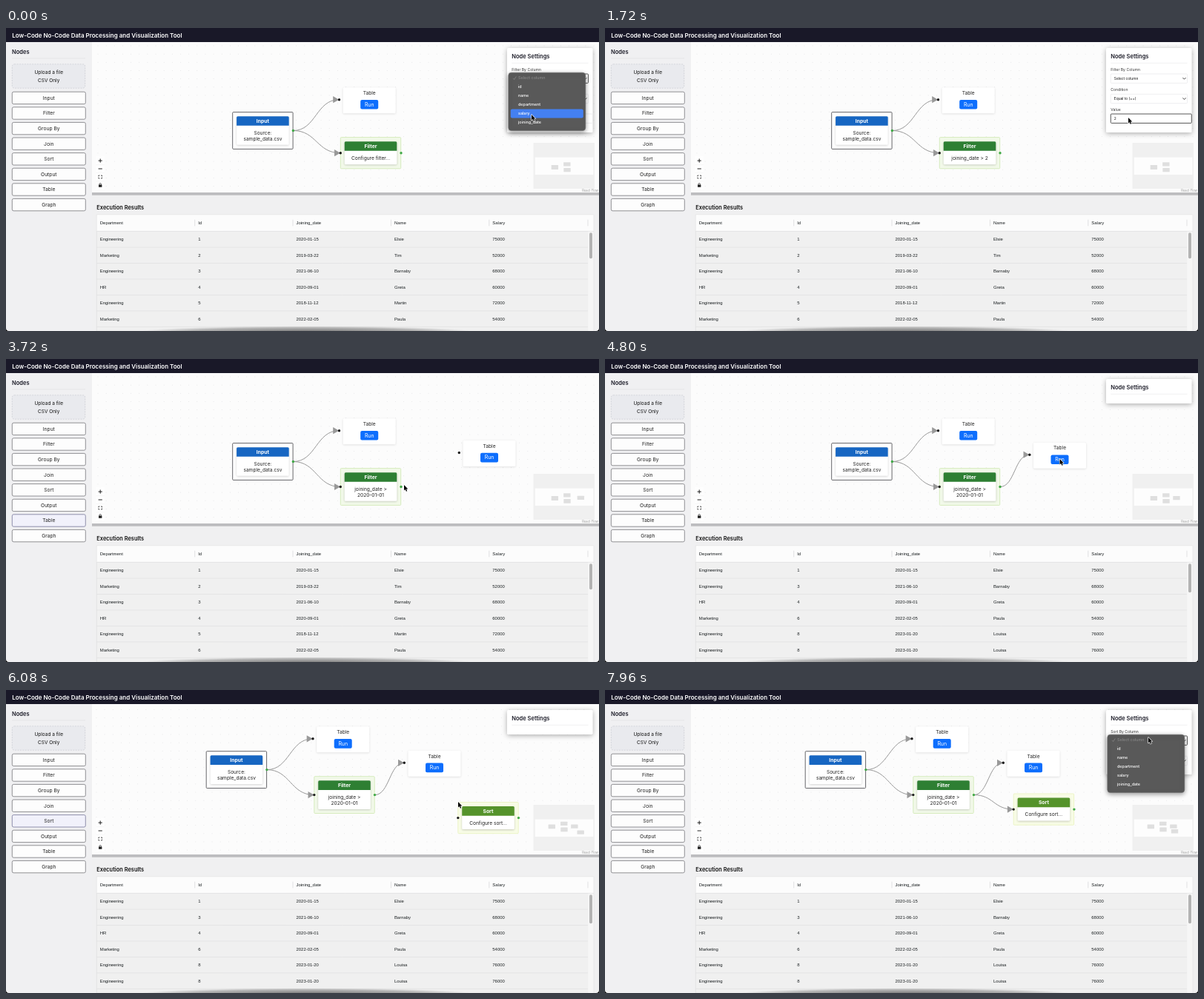
Animation, 800 px wide and 409 px high, one loop 8 s. Source, as an HTML page with a canvas:

```html
<!DOCTYPE html>
<html lang="en">
<head>
<meta charset="utf-8">
<title>Low-Code Data Tool</title>
<style>
  html, body { margin: 0; width: 100%; height: 100%; overflow: hidden; background: #f0f0f1; }
  canvas { display: block; width: 800px; height: 409px; }
</style>
</head>
<body>
<canvas id="stage"></canvas>
<script>
const LOOP = 8000, W = 800, H = 409;
const UI = 'Inter, Roboto, sans-serif';
const GRID = '"Liberation Sans", Arial, sans-serif';
const canvas = document.getElementById('stage');
const ctx = canvas.getContext('2d');
const dpr = window.devicePixelRatio || 1;
canvas.width = W * dpr;
canvas.height = H * dpr;

const BUTTONS = ['Input', 'Filter', 'Group By', 'Join', 'Sort', 'Output', 'Table', 'Graph'];
const COLUMNS = ['Select column', 'id', 'name', 'department', 'salary', 'joining_date'];
const CONDITIONS = ['Equal to (==)', 'Not equal to (!=)', 'Greater than (>)',
  'Greater than or equal to (≥)', 'Less than (<)', 'Less than or equal to (<=)', 'Contains'];
const PEOPLE = {
  1: ['Engineering', '2020-01-15', 'Elsie', '75000'],
  2: ['Marketing', '2019-03-22', 'Tim', '52000'],
  3: ['Engineering', '2021-06-10', 'Barnaby', '68000'],
  4: ['HR', '2020-09-01', 'Greta', '60000'],
  5: ['Engineering', '2018-11-12', 'Martin', '72000'],
  6: ['Marketing', '2022-02-05', 'Paula', '54000'],
  8: ['Engineering', '2023-01-20', 'Louisa', '76000']
};

// Cursor path: time, x, y of the tip
const PATH = [
  [0, 709, 117], [60, 709, 117], [180, 707, 126], [280, 707, 126], [500, 734, 93], [600, 734, 93],
  [820, 727, 122], [940, 727, 122], [1300, 706, 121], [2440, 706, 121], [2700, 566, 172],
  [2820, 566, 172], [3080, 66, 241], [3180, 58, 217], [3240, 58, 217], [3480, 617, 110],
  [3520, 617, 110], [3720, 537, 170], [3800, 533, 172], [4060, 611, 126], [4120, 611, 126],
  [4320, 652, 132], [4560, 652, 132], [4800, 613.5, 135], [4840, 613.5, 135],
  [4960, 391.5, 171], [5000, 391.5, 171], [5280, 356, 140], [5400, 356, 140], [5680, 58, 177],
  [5780, 58, 177], [6040, 610, 151], [6100, 610, 151], [6360, 497, 142], [6420, 497, 142],
  [6700, 605, 171], [6740, 606, 171], [6780, 610, 172], [6900, 650, 163], [6960, 650, 163],
  [7200, 591.5, 151], [7300, 591.5, 151], [7600, 733, 64], [LOOP, 733, 64]
];

const within = (t, a, b) => t >= a && t < b;
const ease = k => k * k * (3 - 2 * k);
const ramp = (t, a, b) => ease(Math.min(1, Math.max(0, (t - a) / (b - a))));
const lerp = (a, b, k) => a + (b - a) * k;

function cursorAt(t) {
  const i = Math.max(1, PATH.findIndex(p => p[0] >= t));
  const a = PATH[i - 1], b = PATH[i];
  const k = ramp(t, a[0], b[0]);
  return { x: lerp(a[1], b[1], k), y: lerp(a[2], b[2], k) };
}

function rect(x, y, w, h, fill, stroke, r = 0, line = 0.6) {
  ctx.beginPath();
  ctx.roundRect(x, y, w, h, r);
  if (fill) { ctx.fillStyle = fill; ctx.fill(); }
  if (stroke) { ctx.strokeStyle = stroke; ctx.lineWidth = line; ctx.stroke(); }
}

function shadowed(blur, color, dy, draw) {
  ctx.save();
  ctx.shadowColor = color;
  ctx.shadowBlur = blur * dpr;
  ctx.shadowOffsetY = dy * dpr;
  draw();
  ctx.restore();
}

// y is the middle of the capitals
function text(str, x, y, size, color = '#222', weight = 400, align = 'left', family = UI) {
  ctx.font = `${weight} ${size}px ${family}`;
  ctx.textAlign = align;
  ctx.fillStyle = color;
  ctx.fillText(str, x, y + size * 0.36);
}

function line(color, width, ...pts) {
  ctx.beginPath();
  pts.forEach(([x, y], i) => i ? ctx.lineTo(x, y) : ctx.moveTo(x, y));
  ctx.strokeStyle = color;
  ctx.lineWidth = width;
  ctx.stroke();
}

function dot(x, y, color) {
  ctx.beginPath();
  ctx.arc(x, y, 1.7, 0, 7);
  ctx.fillStyle = color;
  ctx.fill();
}

function sideButton(label, x, y, hover) {
  rect(x, y, 99, 16.4, hover ? '#f1f1fb' : '#fdfdfd', hover ? '#77779a' : '#77777c', 2, 0.8);
  text(label, x + 49.5, y + 8.2, 6.7, '#222', 400, 'center');
}

const buttonY = i => 86.2 + i * 20.6;

function drawSidebar(t, cur) {
  rect(0, 19, 116, 390, '#f0f0f2');
  text('Nodes', 8, 31.8, 7.5, '#1c1c28', 600);
  line('#dcdce0', 0.6, [8, 41], [107, 41]);
  ctx.setLineDash([2, 1.4]);
  rect(8.3, 48.8, 98.4, 32.4, '#e9eaee', '#c3c5cc', 3);
  ctx.setLineDash([]);
  text('Upload a file', 57.7, 59.8, 6.5, '#111', 400, 'center');
  text('CSV Only', 57.7, 71, 6.5, '#111', 400, 'center');
  const stuck = within(t, 3180, 3960) ? 6 : within(t, 5680, 6300) ? 4 : -1;
  BUTTONS.forEach((label, i) => {
    const y = buttonY(i);
    const over = cur.x > 8 && cur.x < 107 && cur.y > y && cur.y < y + 16.4;
    sideButton(label, 8.3, y, over || i === stuck);
  });
}

function drawDots(pan) {
  const gap = 11.15;
  ctx.fillStyle = '#dedee0';
  const x0 = 116 + (((8 + pan.x) % gap) + gap) % gap;
  const y0 = 19 + (((5 + pan.y) % gap) + gap) % gap;
  for (let x = x0; x < W; x += gap)
    for (let y = y0; y < 222; y += gap) ctx.fillRect(x - 0.4, y - 0.4, 0.8, 0.8);
}

function edge(a, b, loose) {
  const mid = (a.x + b.x) / 2;
  ctx.beginPath();
  ctx.moveTo(a.x, a.y);
  ctx.bezierCurveTo(mid, a.y, mid, b.y, b.x, b.y);
  ctx.strokeStyle = loose ? '#a8a8a8' : '#999';
  ctx.lineWidth = loose ? 0.7 : 1;
  ctx.stroke();
  if (loose) return;
  ctx.beginPath();
  ctx.moveTo(b.x, b.y);
  ctx.lineTo(b.x - 8, b.y - 4.6);
  ctx.lineTo(b.x - 8, b.y + 4.6);
  ctx.closePath();
  ctx.fillStyle = '#999';
  ctx.fill();
}

// Nodes are placed by the middle of their top edge
const outPort = n => ({ x: n.x + 41, y: n.y + n.h / 2 });
const inPort = n => n.kind === 'Table' ? { x: n.x - 41, y: n.y + 16.5 } : { x: n.x - 41, y: n.y + n.h / 2 };

const STYLES = {
  Input: { head: '#1766c2', fill: '#fff', border: '#55555a', radius: 1 },
  Filter: { head: '#2e7f33', fill: '#f2f9e9', border: '#d3eab8', radius: 1 },
  Sort: { head: '#55932b', fill: '#f8fce6', border: '#eaf3c2', radius: 1 }
};

function drawNode(n) {
  const { x, y, h } = n;
  if (n.kind === 'Table') {
    shadowed(3, 'rgba(0,0,0,.13)', 0.8, () => rect(x - 35.5, y, 71, 35, '#fff', null, 1.5));
    text('Table', x, y + 7.4, 6.6, '#222', 400, 'center');
    rect(x - 12, y + 16.8, 24, 12.6, '#0d6efd', null, 2);
    text('Run', x, y + 23, 6.9, '#fff', 400, 'center');
    const p = inPort(n);
    dot(p.x + 0.3, p.y, '#1a1a1a');
    return;
  }
  const s = STYLES[n.kind];
  rect(x - 40.7, y + 0.4, 81.4, h - 0.8, s.fill, s.border, s.radius, 0.9);
  shadowed(3, 'rgba(0,0,0,.2)', 0.8, () => rect(x - 35.3, y + 6, 70.6, h - 12, '#fff', null, 1.5));
  rect(x - 35.3, y + 6, 70.6, 12.6, s.head, null, [1.5, 1.5, 0, 0]);
  text(n.kind, x, y + 12.4, 6.8, '#fff', 700, 'center');
  n.lines.forEach((l, i) => text(l, x, y + 28.2 + i * 7.8, 6.6, '#222', 400, 'center'));
  const o = outPort(n);
  dot(o.x, o.y, '#3fa845');
  if (n.kind !== 'Input') {
    const p = inPort(n);
    dot(p.x + 0.3, p.y, '#1a1a1a');
  }
}

function typedValue(t) {
  const count = Math.floor((t - 1680) / 60) + 1;
  return '2020-01-01'.slice(0, Math.max(0, Math.min(10, count)));
}

function filterLines(t) {
  if (t < 240) return ['Configure filter...'];
  if (t < 920) return ['joining_date =='];
  const value = typedValue(t);
  if (!value) return ['joining_date >'];
  return value.length < 3 ? ['joining_date > ' + value] : ['joining_date >', value];
}

function buildNodes(t, pan) {
  const make = (kind, x, y, lines = []) => ({
    kind, lines, x: x + pan.x, y: y + pan.y,
    h: kind === 'Table' ? 35 : lines.length > 1 ? 50.6 : 43
  });
  const slide = ramp(t, 4560, 4800), drop = ramp(t, 6960, 7200);
  const nodes = {
    input: make('Input', 346.4, 113.2, ['Source:', 'sample_data.csv']),
    table: make('Table', 490.2, 80.2),
    filter: make('Filter', 492, 147.2, filterLines(t))
  };
  if (t >= 3500) nodes.second = make('Table', lerp(652, 613.5, slide), lerp(110, 112.7, slide));
  if (t >= 6060) nodes.sort = make('Sort', lerp(686, 627.4, drop), lerp(182, 170.5, drop), ['Configure sort...']);
  return nodes;
}

function drawControls() {
  rect(121.5, 173.5, 11.6, 44.5, '#fefefe');
  [184.6, 195.6, 206.7].forEach(y => line('#eee', 0.5, [121.5, y], [133, y]));
  line('#222', 1, [124.6, 179.1], [129.8, 179.1]);
  line('#222', 1, [127.2, 176.5], [127.2, 181.7]);
  line('#222', 1, [124.6, 190], [129.8, 190]);
  for (const [sx, sy] of [[-1, -1], [1, -1], [1, 1], [-1, 1]]) {
    const x = 127.2 + sx * 2.3, y = 201 + sy * 2;
    line('#222', 0.8, [x - sx * 1.4, y], [x, y], [x, y - sy * 1.3]);
  }
  rect(125, 211.6, 4.4, 3.2, '#222', null, 0.5);
  rect(126, 209.6, 2.4, 3, null, '#222', 1, 0.7);
}

function drawMinimap(nodes) {
  const k = 0.1145;
  rect(711.5, 155, 82.5, 62, '#f0f0f0');
  rect(713.8, 174.5, 78.6, 23.6, '#fdfdfd');
  for (const n of Object.values(nodes)) {
    const x = 714 + (n.x - 41 - 116) * k, y = 174.3 + (n.y - 19) * k;
    rect(x, y, 82 * k, Math.max(n.h, 46) * k, '#dfdfdf', null, 0.5);
  }
  text('React Flow', 799, 219.8, 4.2, '#999', 400, 'right');
}

function field(label, value, y, focus, chevron = true) {
  text(label, 682.3, y - 11.7, 5.1, '#333');
  rect(682.3, y - 6, chevron ? 103.2 : 109, 12.4, '#fff', focus ? '#444' : '#e3e3e6', 1, focus ? 0.9 : 0.6);
  text(value, 686.8, y, 4.85, '#111');
  if (chevron) line('#222', 0.8, [779.4, y - 1], [781.5, y + 1.2], [783.6, y - 1]);
}

function drawPanel(t) {
  const mode = t < 2800 ? 'filter' : t < 4400 ? null : t < 6960 ? 'empty' : 'sort';
  if (!mode) return;
  const bottom = { filter: 141, empty: 60, sort: 114 }[mode];
  shadowed(7, 'rgba(0,0,0,.32)', 1.5, () => rect(676, 27, 115.6, bottom - 27, '#fff', null, 1.5));
  text('Node Settings', 682.3, 38.5, 7.5, '#1c1c28', 600);
  line('#e6e6e8', 0.6, [682.3, 47.3], [785.5, 47.3]);
  if (mode === 'filter') {
    field('Filter By Column', 'Select column', 68, t < 500);
    field('Condition', 'Equal to (==)', 95.3, within(t, 560, 1300));
    field('Value', typedValue(t), 122, within(t, 1340, 2800), false);
  } else if (mode === 'sort') {
    field('Sort By Column', 'Select column', 68, t >= 7680);
    field('Order', 'Ascending', 95.3, false);
  }
}

function dropdown(items, top, cur, mutedFirst) {
  const first = top + 7, pitch = 12.05;
  const h = items.length * pitch + 6;
  shadowed(6, 'rgba(0,0,0,.4)', 2, () => rect(677.8, top, 104, h, '#595959', '#6d6d6d', 4, 0.5));
  items.forEach((label, i) => {
    const y = first + i * pitch;
    const muted = mutedFirst && i === 0;
    if (!muted && Math.abs(cur.y - y) < pitch / 2 && cur.x > 678 && cur.x < 782)
      rect(680.8, y - 6, 98, 12.2, '#4480f2', null, 2);
    const color = muted ? '#878787' : '#fff';
    text(label, 691, y, 5.4, color, 500);
    if (i === 0) line(color, 0.8, [684.2, y + 0.6], [685.6, y + 2.4], [688.3, y - 1.8]);
  });
}

function drawResults(t) {
  rect(116, 222, 684, 187, '#f0f0f1');
  rect(116, 222, 684, 3.8, '#bdbdbf');
  text('Execution Results', 122.3, 242.8, 7.45, '#111', 600);
  rect(122.3, 252, 670.5, 157, '#f0f0f0', '#dadadc');
  rect(122.6, 252.3, 670, 22, '#fcfcfc');
  const xs = [126.8, 259.2, 391.5, 523.9, 656.3];
  const cell = (s, i, y, color) => text(s, xs[i], y, 5.95, color, 400, 'left', GRID);
  ['Department', 'Id', 'Joining_date', 'Name', 'Salary'].forEach((s, i) => cell(s, i, 263, '#181d1f'));
  [254.7, 387, 519.4, 651.8, 785].forEach(x => line('#d5d5d7', 0.7, [x, 258.7], [x, 267.3]));
  line('#d8d8da', 0.6, [122.3, 274.4], [792.8, 274.4]);
  const ids = t < 4480 ? [1, 2, 3, 4, 5, 6] : [1, 3, 4, 6, 8, 8];
  ids.forEach((id, i) => {
    const y = 285.3 + i * 21.45;
    const [dept, date, name, pay] = PEOPLE[id];
    [dept, String(id), date, name, pay].forEach((s, c) => cell(s, c, y, '#181d1f'));
    line('#dcdcde', 0.6, [122.3, y + 10.8], [785, y + 10.8]);
  });
  rect(785.2, 274.8, 7.4, 134, '#f6f6f6');
  rect(787, 276.3, 4, t < 4480 ? 35 : 39, '#b3b3b3', null, 2);
}

function drawScreenEdge() {
  ctx.save();
  ctx.translate(405, H + 1);
  ctx.scale(1, 0.034);
  const g = ctx.createRadialGradient(0, 0, 0, 0, 0, 225);
  g.addColorStop(0, 'rgba(0,0,0,.5)');
  g.addColorStop(0.7, 'rgba(0,0,0,.25)');
  g.addColorStop(1, 'rgba(0,0,0,0)');
  ctx.fillStyle = g;
  ctx.fillRect(-225, -225, 450, 225);
  ctx.restore();
  ctx.fillStyle = '#000';
  for (const [x, s] of [[0, 1], [W, -1]]) {
    ctx.beginPath();
    ctx.moveTo(x, H - 4);
    ctx.quadraticCurveTo(x, H, x + 4 * s, H);
    ctx.lineTo(x, H);
    ctx.fill();
  }
}

function drawArrow({ x, y }) {
  const shape = [[0, 0], [0, 7.6], [1.7, 6.1], [2.9, 8.8], [4.2, 8.2], [3, 5.6], [5.3, 5.4]];
  ctx.beginPath();
  shape.forEach(([dx, dy]) => ctx.lineTo(x + dx, y + dy));
  ctx.closePath();
  ctx.lineJoin = 'round';
  ctx.strokeStyle = '#fff';
  ctx.lineWidth = 1.2;
  ctx.stroke();
  ctx.fillStyle = '#000';
  ctx.fill();
  ctx.lineJoin = 'miter';
}

function drawHand({ x, y }) {
  rect(x - 2.8, y - 2, 6.4, 5.6, '#fff', '#222', 2, 0.9);
  for (let i = 0; i < 4; i++) rect(x - 2.6 + i * 1.6, y - 3 + Math.abs(i - 1.4) * 0.4, 1.5, 3.2, '#fff', '#222', 0.8, 0.6);
  line('#222', 0.8, [x - 3.6, y + 0.4], [x - 2, y + 2.4]);
}

function drawCursor(t, cur) {
  const hand = within(t, 2600, 2840) || within(t, 4560, 4800) || within(t, 4940, 5300) ||
    within(t, 6640, 6780) || within(t, 6900, 7220);
  (hand ? drawHand : drawArrow)(cur);
}

function drawGhost(t, cur) {
  const i = within(t, 3240, 3490) ? 6 : within(t, 5780, 6050) ? 4 : -1;
  if (i < 0) return;
  ctx.globalAlpha = 0.5;
  sideButton(BUTTONS[i], cur.x - 50, cur.y - 8.2, true);
  ctx.globalAlpha = 1;
}

function drawFlow(t, cur) {
  const k = ramp(t, 5000, 5280);
  const pan = { x: -35.5 * k, y: -30.9 * k };
  const nodes = buildNodes(t, pan);
  ctx.save();
  ctx.beginPath();
  ctx.rect(116, 19, 684, 203);
  ctx.clip();
  rect(116, 19, 684, 203, '#fcfcfc');
  drawDots(pan);
  const { input, table, filter, second, sort } = nodes;
  edge(outPort(input), inPort(table));
  edge(outPort(input), inPort(filter));
  if (t >= 4080) edge(outPort(filter), inPort(second));
  if (t >= 6780) edge(outPort(filter), inPort(sort));
  Object.values(nodes).forEach(drawNode);
  if (within(t, 3800, 4080) || within(t, 6420, 6780)) edge(outPort(filter), cur, true);
  drawControls();
  drawMinimap(nodes);
  drawPanel(t);
  ctx.restore();
}

function draw(t) {
  const cur = cursorAt(t);
  ctx.setTransform(dpr, 0, 0, dpr, 0, 0);
  drawSidebar(t, cur);
  drawFlow(t, cur);
  drawResults(t);
  rect(0, 0, W, 19, '#191828');
  text('Low-Code No-Code Data Processing and Visualization Tool', 8.3, 9.7, 8, '#fff', 600);
  if (t < 240) dropdown(COLUMNS, 60.2, cur, true);
  if (within(t, 560, 920)) dropdown(CONDITIONS, 87.6, cur, false);
  if (t >= 7700) dropdown(COLUMNS, 60.2, cur, true);
  drawGhost(t, cur);
  drawScreenEdge();
  drawCursor(t, cur);
}

const start = performance.now();
function tick() {
  draw((performance.now() - start) % LOOP);
  requestAnimationFrame(tick);
}
tick();
</script>
</body>
</html>
```
